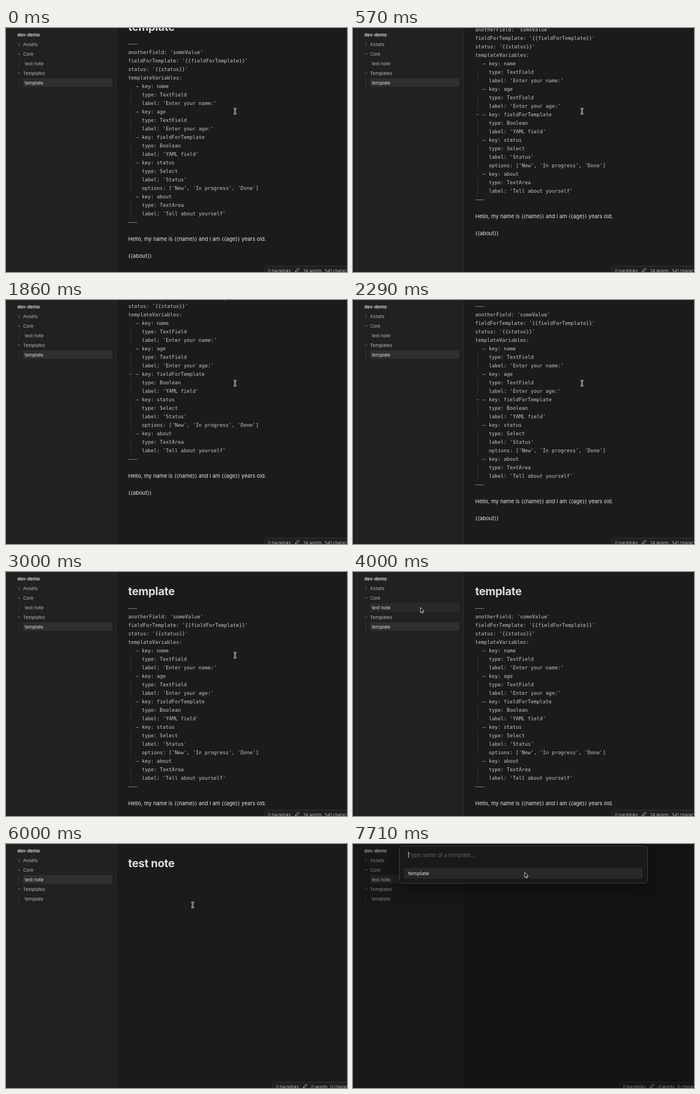
Animation of 600x431 px, one loop 8 s. Source, as an HTML page with a canvas:

```html
<!DOCTYPE html>
<html lang="en">
<head>
<meta charset="utf-8">
<title>Template demo</title>
<style>
  html, body { margin: 0; width: 100%; height: 100%; overflow: hidden; background: #1b1b1b; }
  canvas { display: block; width: 600px; height: 431px; }
</style>
</head>
<body>
<canvas id="stage" width="600" height="431"></canvas>
<script>
const ctx = document.getElementById('stage').getContext('2d');
const W = 600, H = 431, LOOP = 8000, FPS = 7;
const UI = 'Inter, "Open Sans", sans-serif';
const MONO = '"DejaVu Sans Mono", "Liberation Mono", monospace';
const LIT = '#dedede', DIM = '#b6b6b6';

const NOTE = `–––
anotherField: 'someValue'
fieldForTemplate: '{{fieldForTemplate}}'
status: '{{status}}'
templateVariables:
- key: name
  type: TextField
  label: 'Enter your name:'
- key: age
  type: TextField
  label: 'Enter your age:'
- key: fieldForTemplate
  type: Boolean
  label: 'YAML field'
- key: status
  type: Select
  label: 'Status'
  options: ['New', 'In progress', 'Done']
- key: about
  type: TextArea
  label: 'Tell about yourself'
–––`.split('\n');
const LEADING = 15;
const FOLD_LINE = NOTE.indexOf('- key: fieldForTemplate');

// Moments in ticks of 1/7 s
const TICK = { select: 30, open: 31, words: 34, modal: 43, picker: 51 };

// Smooth progress from 0 at tick a to 1 at tick b
function ease(k, a, b) {
  const u = Math.min(1, Math.max(0, (k - a) / (b - a)));
  return u * u * (3 - 2 * u);
}

function scrollTop(k) {
  return Math.round(36 + 80 * ease(k, 0, 8) - 116 * ease(k, 10.4, 21));
}

function mouse(k) {
  const toList = ease(k, 22, 30), toNote = ease(k, 33, 38), toPick = ease(k, 46, 54);
  return [
    403 - 337 * toList + 262.5 * toNote - 26.5 * toPick,
    147 - 85.5 * toList - 26 * Math.sin(Math.PI * toList) + 46 * toNote - 57.5 * toPick
  ];
}

function rect(x, y, w, h, color) {
  ctx.fillStyle = color;
  ctx.fillRect(x, y, w, h);
}

function box(x, y, w, h, r, fill, border) {
  ctx.beginPath();
  ctx.roundRect(x, y, w, h, r);
  ctx.fillStyle = fill;
  ctx.fill();
  if (border) {
    ctx.shadowColor = 'transparent';
    ctx.strokeStyle = border;
    ctx.lineWidth = 1;
    ctx.stroke();
  }
}

function text(str, x, y, font, color) {
  ctx.font = font;
  ctx.fillStyle = color;
  ctx.fillText(str, x, y);
}

function line(points, color, width) {
  ctx.beginPath();
  points.forEach(([x, y]) => ctx.lineTo(x, y));
  ctx.strokeStyle = color;
  ctx.lineWidth = width;
  ctx.stroke();
}

function chevron(x, y, open) {
  ctx.save();
  ctx.translate(x, y);
  if (open) ctx.rotate(Math.PI / 2);
  line([[-1.2, -2.5], [1.3, 0], [-1.2, 2.5]], '#858585', 0.9);
  ctx.restore();
}

function folder(name, y, open) {
  chevron(23, y, open);
  text(name, 30, y + 3, '8px ' + UI, DIM);
}

function file(name, y, active, hover) {
  if (active || hover) box(30, y - 7.5, 157, 15, 2, active ? '#2f2f2f' : '#2a2a2a');
  rect(22, y - 7.5, 1, 15, '#353535');
  text(name, 33, y + 3, '8px ' + UI, active || hover ? LIT : DIM);
}

function sidebar(k, mx, my) {
  rect(0, 0, 194, H, '#212121');
  rect(7, 0, 1, H, '#2b2b2b');
  rect(194, 0, 1, H, '#2d2d2d');
  const onNote = k >= TICK.select;
  const hover = mx > 30 && mx < 187 && Math.abs(my - 62.5) < 8;
  text('dev-demo', 20, 15, '600 8px ' + UI, LIT);
  folder('Assets', 29, false);
  folder('Core', 46, true);
  file('test note', 62.5, onNote, hover);
  folder('Templates', 79.5, true);
  file('template', 96.5, !onNote, false);
}

function title(str, y) {
  ctx.letterSpacing = '-0.2px';
  text(str, 215, y, '700 19.4px ' + UI, LIT);
  ctx.letterSpacing = '0px';
}

function templateNote(k) {
  const top = -scrollTop(k);
  title('template', top + 41);
  NOTE.forEach((str, i) => {
    const y = top + 64 + i * LEADING;
    const child = str.startsWith('  '), key = str.startsWith('- ');
    if (child) rect(219, y - 8, 1, LEADING, '#303030');
    const x = child ? 239 : key ? 228.4 : 215;
    text(str.trim().replace(/^-/, '–'), x, y + 3, '8.75px ' + MONO, '#c6c6c6');
  });
  if (k >= 4 && k < 17) chevron(219, top + 64 + FOLD_LINE * LEADING, true);
  const body = '9.4px ' + UI;
  text('Hello, my name is {{name}} and I am {{age}} years old.', 215, top + 412, body, '#e4e4e4');
  text('{{about}}', 215, top + 442, body, '#e4e4e4');
}

function testNote(k) {
  title('test note', 41);
  const blinkOn = (k - TICK.open) % 8 < 4 && k < 42;
  if (blinkOn) rect(215, 57, 1, 13, '#d0d0d0');
}

function statusBar(k) {
  const empty = k >= TICK.open, none = k >= TICK.words;
  const x = none ? 475 : empty ? 470 : 461, y = 431.5;
  const font = '7.5px ' + UI;
  box(x - 5.5, 420.5, W, 30, 4, '#202020', '#333');
  text('0 backlinks', x, y, font, DIM);
  ctx.save();
  ctx.translate(x + 51, 428);
  ctx.rotate(Math.PI / 4);
  line([[0, 4.8], [-1.2, 2.6], [-1.2, -4], [1.2, -4], [1.2, 2.6], [0, 4.8]], DIM, 0.9);
  ctx.restore();
  text(none ? '0 words' : '74 words', x + 62, y, font, DIM);
  text(empty ? '0 characters' : '541 characters', empty ? 570.5 : 561, y, font, DIM);
}

function modal(k) {
  rect(0, 0, W, H, 'rgba(0,0,0,0.29)');
  const picker = k >= TICK.picker;
  ctx.save();
  ctx.shadowColor = 'rgba(0,0,0,0.45)';
  ctx.shadowBlur = 28;
  ctx.shadowOffsetY = 8;
  box(81.5, 3.5, 437, picker ? 66 : 338, 6, '#191919', '#414141');
  ctx.restore();
  box(90, 42, 420, 19.5, 3, '#272727');
  if (picker) {
    text('Type name of a template...', 97, 22.6, '9.4px ' + UI, '#636363');
    text('template', 97, 55.2, '9px ' + UI, LIT);
  }
  rect(97, 13.5, 1, 11, '#cfcfcf');
}

function beam(x, y) {
  for (const [color, width] of [['#e4e4e4', 2.3], ['#222', 0.8]]) {
    for (const s of [-1, 1]) {
      line([[x - 2.4, y + 4.8 * s], [x, y + 4 * s], [x + 2.4, y + 4.8 * s]], color, width);
    }
    line([[x, y - 4], [x, y + 4]], color, width);
  }
}

function arrow(x, y) {
  const shape = [[0, 0], [0, 9.2], [2.1, 7.3], [3.5, 10.4], [5, 9.7], [3.7, 6.7], [6.5, 6.5]];
  ctx.beginPath();
  shape.forEach(([a, b]) => ctx.lineTo(x + a, y + b));
  ctx.closePath();
  ctx.fillStyle = '#0a0a0a';
  ctx.fill();
  ctx.strokeStyle = '#e6e6e6';
  ctx.lineWidth = 0.9;
  ctx.stroke();
}

function draw(t) {
  const k = Math.floor((t + 5) * FPS / 1000) % (LOOP * FPS / 1000);
  const [mx, my] = mouse(k);
  rect(0, 0, W, H, '#1b1b1b');
  if (k < TICK.open) templateNote(k); else testNote(k);
  sidebar(k, mx, my);
  statusBar(k);
  if (k >= TICK.modal) modal(k);
  if (mx < 195 || k >= TICK.modal) arrow(mx, my); else beam(mx, my);
}

function loop() {
  draw(performance.now() % LOOP);
  requestAnimationFrame(loop);
}
loop();
</script>
</body>
</html>
```
